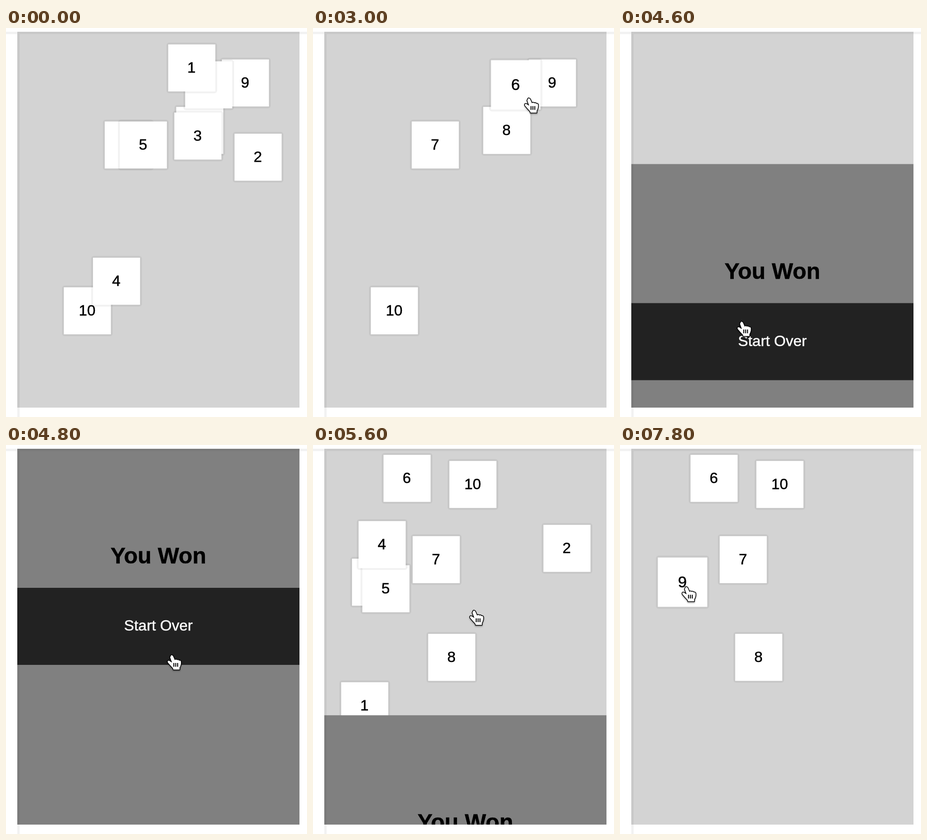
Animation of 640 by 828 pixels, one loop 8000 ms. Source, as an HTML page with a canvas:

```html
<!DOCTYPE html>
<html lang="en">
<head>
<meta charset="utf-8">
<title>Number cards</title>
<style>
  html, body { margin: 0; width: 100%; height: 100%; overflow: hidden; background: #fff; }
  canvas { display: block; }
</style>
</head>
<body>
<canvas id="stage" width="640" height="828"></canvas>
<script>
const ctx = document.getElementById('stage').getContext('2d');
const LOOP = 8000, STEP = 200, SIZE = 100, HALF = SIZE / 2;
const HOLD = 260;        // how long the pointer stays on a card before it is clicked away
const SLIDE = 300;       // duration of the win screen's slide
const BOARD = { x: 24, y: 8, w: 600, h: 800 };
const FONT = '"Liberation Sans", Arial, sans-serif';

const ease = x => {
  const u = Math.min(1, Math.max(0, x));
  return u * u * (3 - 2 * u);
};
const mix = (a, b, s) => a + (b - a) * s;

// One stop per card, visited in order at an even pace; the touch point drifts across the card.
const visit = (cards, start, pace, reach, low) => cards.map(([x, y], i) => ({
  x: x + HALF + reach * Math.cos(0.24 * (i - 2)),
  y: y + HALF + low + 1.4 * (i - 2),
  at: start + i * pace,
  until: start + i * pace + HOLD
}));

// Where cards 1 to 10 were dropped in each game.
const layouts = [
  [[345, 35], [486, 225], [358, 180], [185, 489], [242, 199],
   [381, 71], [210, 199], [362, 168], [459, 67], [123, 552]],
  [[60, 505], [490, 170], [471, 691], [97, 162], [105, 256],
   [150, 21], [212, 194], [245, 402], [83, 242], [290, 34]]
];
const visits = [
  visit(layouts[0], 1130, 335, 38, 24),
  visit(layouts[1], 6051, 372, -15, -7)
];
const stops = [
  { x: 330, y: 520, at: 400, until: 400 },
  { x: 350, y: 330, at: 800, until: 1000 },
  ...visits[0],
  { x: 353, y: 447, at: 4800, until: 4900 },
  { x: 343, y: 352, at: 5400, until: 5900 },
  ...visits[1]
];

const handShape = new Path2D('M8 4Q9-1 13 3L17 12Q19 9 22 12Q24 10 26 13Q29 12 30 15V20' +
  'Q29 25 27 28V32H14L13 29Q9 25 4 19Q0 15 3 13Q6 13 9 16L11 17L7 6Z');
const handLines = new Path2D('M15 18V26M19 18V26M23 18V26');
const arrowShape = new Path2D('M0 0V26L6 20L11 31L15 29L11 19H18Z');

// The pointer sweeps sideways first, then swings up or down onto its goal.
function tipAt(t) {
  const i = stops.findLastIndex(stop => stop.at <= t);
  if (i < 0) return null;
  const a = stops[i], b = stops[i + 1] || a;
  const s = t < a.until ? 0 : ease((t - a.until) / (b.at - a.until || 1));
  return { x: mix(a.x, b.x, s), y: mix(a.y, b.y, s ** 4) };
}

const inside = (tip, [x, y]) => tip &&
  Math.abs(tip.x - x - HALF) <= HALF && Math.abs(tip.y - y - HALF) <= HALF;

const overlayOffset = t =>
  BOARD.h * (1 - ease((t - 4420) / SLIDE) + ease((t - 5407) / SLIDE));

function rect(color, x, y, w, h) {
  ctx.fillStyle = color;
  ctx.fillRect(x, y, w, h);
}

function label(text, x, y, color, font) {
  ctx.fillStyle = ctx.strokeStyle = color;
  ctx.font = `${font} ${FONT}`;
  ctx.textAlign = 'center';
  ctx.lineWidth = 0.5;
  ctx.fillText(text, x, y);
  ctx.strokeText(text, x, y);
}

function drawCard(number, [x, y], scale) {
  ctx.save();
  ctx.translate(x + HALF, y + HALF);
  ctx.scale(scale, scale);
  ctx.fillStyle = 'rgba(0,0,0,.05)';
  ctx.beginPath();
  ctx.roundRect(-HALF - 4, -HALF - 4, SIZE + 8, SIZE + 8, 6);
  ctx.fill();
  rect('#fff', -HALF, -HALF, SIZE, SIZE);
  label(number, -0.5, 10, '#000', '32px');
  ctx.restore();
}

function drawOverlay(offset) {
  const top = BOARD.y + offset;
  rect('#808080', BOARD.x, top, BOARD.w, BOARD.h);
  label('You Won', 324, top + 244, '#000', 'bold 48px');
  rect('#222', BOARD.x, top + 296, BOARD.w, 164);
  label('Start Over', 324, top + 387, '#fff', '32px');
}

function drawPointer({ x, y }, isHand) {
  const [shape, fill, line, width] = isHand
    ? [handShape, '#fff', '#000', 3]
    : [arrowShape, '#000', '#fff', 4];
  ctx.save();
  ctx.translate(isHand ? x - 11 : x, isHand ? y - 1 : y + 1);
  ctx.lineJoin = 'round';
  ctx.shadowColor = 'rgba(0,0,0,.35)';
  ctx.shadowBlur = 3;
  ctx.shadowOffsetY = 2;
  ctx.lineWidth = width;
  ctx.strokeStyle = line;
  ctx.fillStyle = fill;
  ctx.stroke(shape);
  ctx.shadowColor = 'transparent';
  ctx.fill(shape);
  ctx.lineWidth = 2;
  if (isHand) ctx.stroke(handLines);
  ctx.restore();
}

function draw(t) {
  const game = t < 5400 ? 0 : 1;
  const cards = layouts[game];
  const alive = i => t < visits[game][i].until;
  const tip = tipAt(t), before = tipAt(t - 40);
  const hovered = cards.findIndex((card, i) => alive(i) && inside(tip, card));
  const offset = overlayOffset(t);

  rect('#fff', 0, 0, 640, 828);
  ctx.save();
  ctx.beginPath();
  ctx.rect(BOARD.x, BOARD.y, BOARD.w, BOARD.h);
  ctx.clip();
  rect('#d3d3d3', BOARD.x, BOARD.y, BOARD.w, BOARD.h);
  for (let i = cards.length - 1; i >= 0; i--) {
    // A card grows once the pointer has rested on it.
    const grown = i === hovered && inside(before, cards[i]);
    if (alive(i)) drawCard(i + 1, cards[i], grown ? 1.05 : 1);
  }
  if (offset < BOARD.h) drawOverlay(offset);
  ctx.restore();

  // Soft page shadow along the top and left edges.
  rect('rgba(0,0,0,.05)', 0, 8, 640, 5);
  rect('rgba(0,0,0,.05)', 24, 13, 5, 815);

  if (tip) drawPointer(tip, hovered >= 0 || offset < BOARD.h);
}

function tick(now) {
  draw(Math.floor(now % LOOP / STEP) * STEP);
  requestAnimationFrame(tick);
}
requestAnimationFrame(tick);
</script>
</body>
</html>
```
